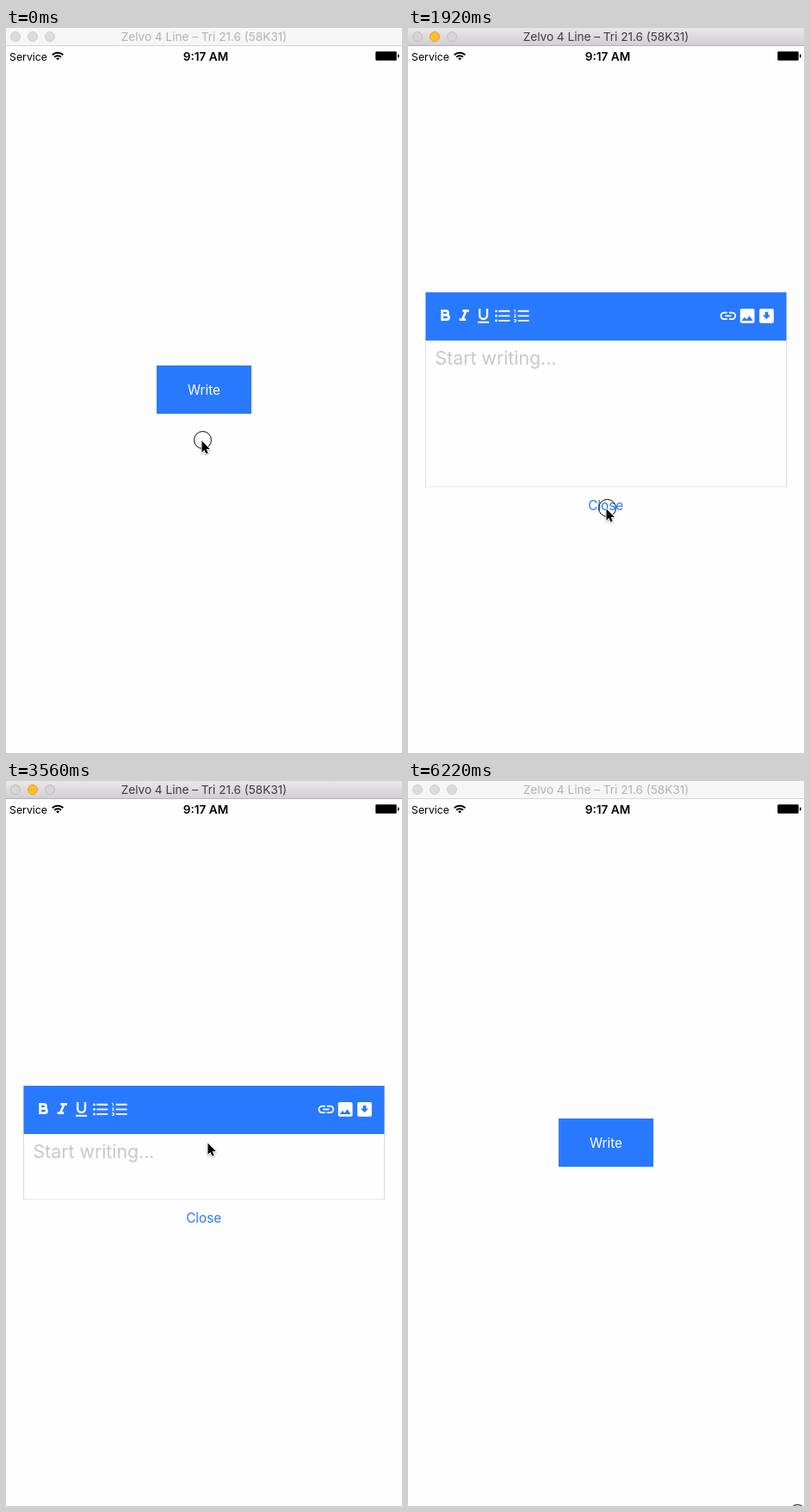
Recreate the animation shown at these times as an HTML page. Size 460 by 842 pixels, loop 6320 ms.

```html
<!DOCTYPE html>
<html lang="en">
<head>
<meta charset="utf-8">
<title>Expanding editor</title>
<style>
  html, body { margin: 0; width: 460px; height: 842px; overflow: hidden; background: #fefefe; }
  svg { display: block; font-family: Inter, sans-serif; }
  svg svg { overflow: hidden; }
  .mid { text-anchor: middle; }
  .line { fill: none; stroke: #fff; stroke-width: 2; }
  .chrome { fill: #f6f6f6; }
  .edge { fill: #d6d6d6; }
  .lights { fill: #dcdcdc; stroke: #cfcfcf; }
  .title { fill: #b2b2b2; }
  .active .chrome { fill: url(#metal); }
  .active .edge { fill: #b3b1b3; }
  .active .lights { fill: #d8d5d8; stroke: #bfbcbf; }
  .active .amber { fill: #fdbd2e; stroke: #e2a42c; }
  .active .title { fill: #3e3c3e; }
</style>
</head>
<body>
<svg width="460" height="842">
  <defs>
    <linearGradient id="metal" x2="0" y2="1">
      <stop stop-color="#e9e7e9"/><stop offset="1" stop-color="#d1cfd1"/>
    </linearGradient>
    <path id="lines" class="line" d="M7 6h14M7 12h14M7 18h14"/>
    <path id="tile" d="M5 3h14a2 2 0 0 1 2 2v14a2 2 0 0 1-2 2H5a2 2 0 0 1-2-2V5a2 2 0 0 1 2-2z"/>
  </defs>

  <g id="window">
    <rect class="chrome" width="460" height="20"/>
    <rect class="edge" y="20" width="460" height="1"/>
    <g class="lights">
      <circle cx="11" cy="10" r="5.5"/>
      <circle class="amber" cx="31" cy="10" r="5.5"/>
      <circle cx="51" cy="10" r="5.5"/>
    </g>
    <text class="title mid" x="230" y="15" font-size="13.6">Zelvo 4 Line – Tri 21.6 (58K31)</text>
  </g>

  <text x="4" y="37.5" font-size="12.3">Service</text>
  <g fill="none" stroke="#000" stroke-width="2">
    <path d="M53.8 31.2a9 9 0 0 1 12.6 0M56.2 33.8a5.6 5.6 0 0 1 7.8 0"/>
    <path d="M60.1 37.4l-2-2.1a3 3 0 0 1 4 0z" fill="#000" stroke="none"/>
  </g>
  <text class="mid" x="232" y="37.5" font-size="13.6" font-weight="600">9:17 AM</text>
  <rect x="429.5" y="27.5" width="24" height="10" rx="1" stroke="#444"/>
  <rect x="455" y="30.5" width="1.5" height="4" rx=".7"/>

  <svg id="box">
    <rect id="frame" x=".5" y=".5" fill="#fefefe" stroke="#dcdcdc"/>
    <rect id="bar" x=".5" y=".5" height="56" fill="#2979ff"/>
    <g id="icons" fill="#fff">
      <svg id="left" height="57">
        <g transform="translate(11.8 16.7) scale(.93)">
          <path class="line" style="stroke-width:3" d="M8.5 11H13a2.75 2.75 0 0 0 0-5.5H8.5v11H14a2.75 2.75 0 0 0 0-5.5"/>
          <path transform="translate(24)" d="M10 4v3h2.2l-3.4 8H6v3h8v-3h-2.2l3.4-8H18V4z"/>
          <g transform="translate(48)" class="line">
            <path style="stroke-width:2.5" d="M7.25 3v8a4.75 4.75 0 0 0 9.5 0V3"/>
            <path d="M5 20h14"/>
          </g>
          <g transform="translate(72)">
            <use href="#lines"/>
            <path class="line" style="stroke-width:3" stroke-linecap="round" d="M4 6h0M4 12h0M4 18h0"/>
          </g>
          <g transform="translate(96)">
            <use href="#lines"/>
            <path class="line" style="stroke-width:1" d="M2 4.5h1.5V8M2 10.5h2.5L2.4 13.5H5M2 16.5h2.5v3H2M3 18h1.5"/>
          </g>
        </g>
      </svg>
      <g id="right">
        <g transform="translate(0 16.7) scale(.93)">
          <path class="line" d="M11 8H7a4 4 0 0 0 0 8h4M13 8h4a4 4 0 0 1 0 8h-4M8 12h8"/>
          <g transform="translate(24)">
            <use href="#tile"/>
            <path fill="#2979ff" d="M8.5 13.5L5 18h14l-4.5-6-3.5 4.5z"/>
          </g>
          <g transform="translate(48)">
            <use href="#tile"/>
            <path fill="#2979ff" d="M10 7v4H7l5 5 5-5h-3V7z"/>
          </g>
        </g>
      </g>
    </g>
    <text x="11.5" y="84" font-size="21.3" fill="#c8c8ca">Start writing...</text>
    <rect id="caret" x="11" y="61" width="2" height="29" rx="1" fill="#5874e4"/>
  </svg>

  <g id="write">
    <rect x="210" y="408" width="40" height="24" fill="#2979ff"/>
    <text class="mid" x="230" y="426" font-size="15.3" fill="#fff">Write</text>
  </g>
  <text id="close" class="mid" x="229.7" font-size="15.3" fill="#2979ff">Close</text>

  <g id="pointer">
    <circle id="ring" cx="1.5" cy="-.5" r="10" fill="none" stroke="#000"/>
    <path d="M0 0V14.2L3.2 11.2 5.3 16.2 7.7 15.2 5.6 10.3H10z" stroke="#fff" stroke-width="1.6"
          paint-order="stroke" transform="translate(.5 .5) scale(.93)" style="filter:drop-shadow(0 1px 1px #0005)"/>
  </g>
</svg>

<script>
const LOOP = 6320, ACTIVATE = 1860, FOCUS = 3930, LEAVE = 6220;
const WIDEN = 300, GROW = 250, SHRINK = 120, GAP = 27;
const cycles = [{ open: 606, close: 2081 }, { open: 3143, close: 4541 }];

const home = { x: 227, y: 479 }, button = { x: 234, y: 420 }, closer = { x: 230, y: 558 };
const peak = { x: 252, y: 406 }, exit = { x: 451, y: 851 };
// Pointer moves; "via" bends the path
const moves = [
  { from: 850, to: 1800, goal: closer },
  { from: 2180, to: 2780, goal: button, via: { x: 273, y: 454 } },
  { from: 3580, to: 3850, goal: closer },
  { from: 5220, to: 5430, goal: peak },
  { from: 5430, to: 5890, goal: exit, via: { x: 300, y: 760 } }
];

const $ = id => document.getElementById(id);
const set = (id, attrs) => {
  for (const name in attrs) $(id).setAttribute(name, attrs[name]);
};
const inOut = p => p < .5 ? 2 * p * p : 1 - 2 * (1 - p) ** 2;
const outQuad = p => 1 - (1 - p) ** 2;
const progress = (t, start, length) => Math.min(1, Math.max(0, (t - start) / length));
const ramp = (t, start, length) => inOut(progress(t, start, length));
const bend = (a, c, b, p) => (1 - p) ** 2 * a + 2 * p * (1 - p) * c + p * p * b;

function pointerAt(t) {
  let at = home;
  for (const { from, to, goal, via } of moves) {
    if (t < from) break;
    const ease = goal === exit ? inOut : outQuad;
    const p = ease(progress(t, from, to - from));
    const c = via || { x: (at.x + goal.x) / 2, y: (at.y + goal.y) / 2 };
    at = { x: bend(at.x, c.x, goal.x, p), y: bend(at.y, c.y, goal.y, p) };
  }
  return at;
}

// Every action follows a press released 50 ms earlier
const pressed = t => t < 60 || t >= LEAVE ||
  cycles.some(c => [c.open, c.close].some(at => t >= at - 220 && t < at - 50));

function draw(t) {
  let open = 0, tall = 0;
  for (const c of cycles) {
    open += ramp(t, c.open, WIDEN) - ramp(t, c.close + SHRINK + GAP, WIDEN);
    tall += ramp(t, c.open + WIDEN, GROW) - ramp(t, c.close, SHRINK);
  }
  const width = 111 + 309 * open;
  const height = 57 + 2 * Math.round(85 * tall);
  const { x, y } = pointerAt(t);

  set('window', { class: t >= ACTIVATE && t < LEAVE ? 'active' : '' });
  set('box', { x: 230 - width / 2, y: 420 - height / 2, width, height });
  set('frame', { width: width - 1, height: height - 1 });
  set('bar', { width: width - 1 });
  set('icons', { opacity: open });
  set('left', { width: Math.max(0, width - 79) });
  set('right', { transform: `translate(${width - 79.3})` });
  set('caret', { opacity: +(t >= FOCUS) });
  set('write', { opacity: 1 - open });
  set('close', { y: 446.5 + height / 2, opacity: open });
  set('pointer', { transform: `translate(${x} ${y})` });
  set('ring', { opacity: +pressed(t) });
}

function tick() {
  draw(performance.now() % LOOP);
  requestAnimationFrame(tick);
}
tick();
</script>
</body>
</html>
```
